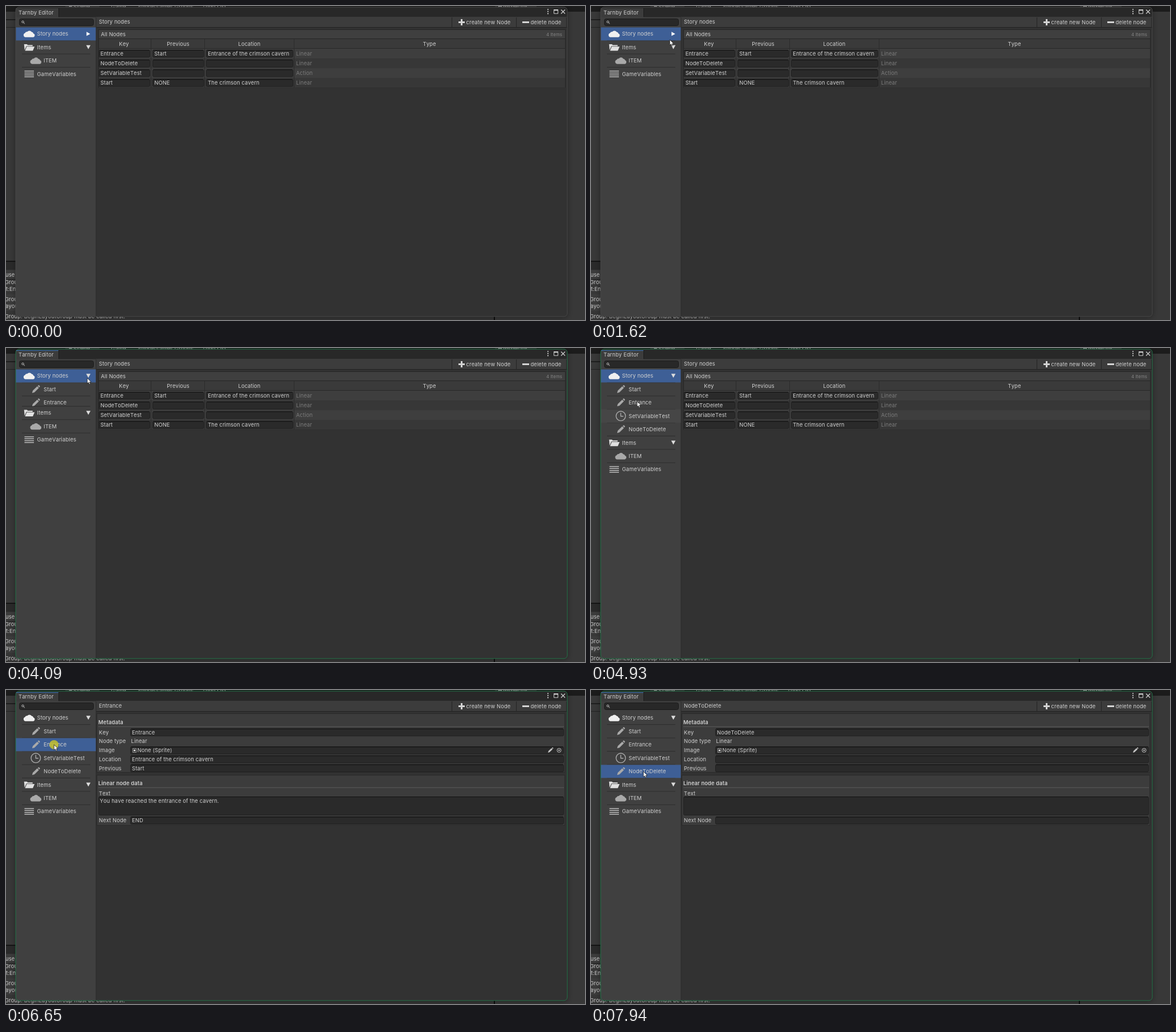
Animation, 1016 px wide and 551 px high, one loop 8 s. Source, as an HTML page:

```html
<!DOCTYPE html>
<html lang="en">
<head>
<meta charset="utf-8">
<title>Node editor</title>
<style>
  html, body { margin: 0; width: 100%; height: 100%; overflow: hidden; background: #383838; }
  svg { display: block; width: 1016px; height: 551px; }
  text {
    font: 9.4px Inter, "Liberation Sans", sans-serif;
    font-kerning: none; letter-spacing: .13px; fill: #d0d0d0; white-space: pre;
  }
  .bold { font-weight: 600; }
  .dim { fill: #7b7b7b; }
  .small { font-size: 7.8px; letter-spacing: .1px; fill: #858585; }
  .mid { text-anchor: middle; }
  .shadow { filter: drop-shadow(0 1px 5px rgba(0, 0, 0, .4)); }
</style>
</head>
<body>
<svg id="stage" viewBox="0 0 1016 551" xmlns="http://www.w3.org/2000/svg"></svg>
<script>
const LOOP = 8000, STEP = 68.3, START = 260, FOCUS = 2719;
const ROW = 23.45, TOP = 37.2, KIDS = 4;

// Markup helpers
const rect = (x, y, w, h, fill, more = '') =>
  `<rect x="${x}" y="${y}" width="${w}" height="${h}" fill="${fill}" ${more}/>`;
const path = (d, fill, more = '') => `<path d="${d}" fill="${fill}" ${more}/>`;
const line = (d, color, w = 1) => path(d, 'none', `stroke="${color}" stroke-width="${w}"`);
const text = (x, cy, s, cls = '') => `<text x="${x}" y="${cy + 3.4}" class="${cls}">${s}</text>`;
const at = (x, y, s) => `<g transform="translate(${x} ${y})">${s}</g>`;
const field = (x, y, w, h = 13) =>
  rect(x + .5, y + .5, w - 1, h - 1, '#2a2a2a', 'rx="2" stroke="#202020"') +
  rect(x + 1.5, y, w - 3, 1, '#111');

// Icons, centred on 0,0
const cloud = c => path('M-6.5 5.8A3.7 3.7 0 0 1 -7.3 -1.4A3.6 3.6 0 0 1 -3.4 -3.6A4.6 4.6 0 0 1 4.2 -3.4A3.4 3.4 0 0 1 7.4 -.8A3.4 3.4 0 0 1 7 5.8Z', c);
const folder = c => path('M-9 -5.5H-4L-2.5 -4H6V-2H-5L-8 5Z', c) + path('M-4.3 -1.2H9.5L6.3 6H-7.3Z', c);
const list = c => [-5, -1.7, 1.7, 5].map(y => rect(-8.3, y - .7, 16.6, 1.4, c)).join('');
const pencil = c => path('M-6.5 6.5L-5.3 2.3L2.5 -5.2L5.4 -2.3L-2.3 5.3ZM3.4 -6L4.6 -7.1Q5.3 -7.5 6 -6.8L7.1 -5.7Q7.6 -5 7 -4.3L6.1 -3.2Z', c);
const clock = c => `<circle r="8.3" fill="none" stroke="${c}" stroke-width="1.4"/>` + line('M0 -5.5V.5H4.5', c, 1.4);
const arrowDown = path('M-3.8 -3.4H3.8L0 3.6Z', '#dcdcdc');
const arrowRight = path('M-3 -3.6V3.6L3.4 0Z', '#fff');

const mid = i => TOP + ROW * (i + .5);
const rule = i => rect(28, TOP + ROW * i - .5, 120, 1, '#2d2d2d');
const item = (i, icon, label, depth = 0, tint = '#e0e0e0') =>
  at(depth ? 52.3 : 40.7, mid(i), icon(depth ? '#a9a9a9' : tint)) + text(depth ? 66 : 54.5, mid(i), label);

function backdrop() {
  const tabs = [[110, '# Scene'], [172, '▬ Game'], [231, 'Addressables Groups'], [344, 'Todo List'], [864, '◘ Inspector']];
  const log = [[-1, 472, 'use'], [-2, 485, 'Group'], [0, 497, 't:EndLayout'], [-2, 515, 'Group'],
    [-1, 526.5, 'ayout'], [-2, 545, 'Group: BeginLayoutGroup must be called first.']];
  return rect(0, 0, 1016, 551, '#383838') + rect(0, 0, 1016, 10, '#1c1c1c') +
    rect(104, 0, 60, 4, '#333') + rect(858, 0, 73, 9, '#333') +
    tabs.map(([x, s]) => text(x, 1.8, s)).join('') +
    rect(0, 11, 17, 12, '#383838') + rect(0, 23, 17, 2, '#1e1e1e') + rect(0, 37, 17, 1, '#222') +
    rect(0, 447, 17, 2, '#151515') + rect(0, 449, 17, 14, '#2a2a2a') +
    rect(0, 463, 17, 17, '#3c3c3c') + rect(0, 479, 17, 1, '#222') +
    rect(0, 506, 17, 29, '#3c3c3c') + rect(0, 535, 857, 16, '#363636') +
    rect(856, 535, 2, 16, '#0c0c0c') + log.map(l => text(...l)).join('');
}

function frame() {
  return rect(17, 2, 968, 543, '#323232', 'rx="6" class="shadow"') +
    path('M17 19V8Q17 2 23 2H979Q985 2 985 8V19Z', '#282828') +
    rect(17, 4, 75, 16, '#3c3c3c') + rect(92, 4, 1, 15, '#1c1c1c') +
    text(22, 12, 'Tarnby Editor') +
    [6, 9.7, 13.4].map(y => `<circle cx="951" cy="${y}" r="1.1" fill="#ccc"/>`).join('') +
    line('M961.5 6.5H968.5V13.3H961.5Z', '#ccc') + rect(961, 6, 8, 2.2, '#ccc') +
    line('M974 6.5L981 13.5M981 6.5L974 13.5', '#ccc', 1.3) +
    rect(158, 19, 827, 18.5, '#3c3c3c') + rect(158, 37, 827, 1, '#222') +
    [782, 895, 983].map(x => rect(x, 20, 1, 17, '#242424')).join('') +
    rect(794, 27, 11, 3, '#d4d4d4') + rect(798, 23, 3, 11, '#d4d4d4') + text(807.5, 28.5, 'create new Node') +
    rect(906, 27, 12, 3, '#d4d4d4') + text(920.5, 28.5, 'delete node');
}

function menu() {
  return path('M17 20H158V545H23Q17 545 17 539Z', '#404040') + rect(157.5, 20, 1, 525, '#2a2a2a') +
    rect(23.5, 22.5, 130, 12, '#282828', 'rx="3" stroke="#1a1a1a"') +
    '<circle cx="29.5" cy="27.8" r="1.7" fill="none" stroke="#c4c4c4"/>' + line('M30.7 29L33 31.3', '#c4c4c4') +
    `<clipPath id="fold"><rect id="foldBox" x="17" y="${TOP + ROW - 1}" width="141" height="0"/></clipPath>` +
    '<g clip-path="url(#fold)">' + [1, 2, 3, 4].map(rule).join('') + '</g>' +
    '<g class="low">' + [1, 2, 3].map(rule).join('') + '</g>' +
    rect(17, 0, 140.5, ROW, '#464646', 'id="hover"') + rect(17, 0, 140.5, ROW - .6, '#3e5f96', 'id="pick"') +
    item(0, cloud, 'Story nodes', 0, '#f0f0f0') +
    `<g id="shut">${at(144.3, mid(0), arrowRight)}</g><g id="open">${at(144.5, mid(0) - .3, arrowDown)}</g>` +
    '<g clip-path="url(#fold)">' + item(1, pencil, 'Start', 1) + item(2, pencil, 'Entrance', 1) +
    item(3, clock, 'SetVariableTest', 1) + item(4, pencil, 'NodeToDelete', 1) + '</g>' +
    '<g class="low">' + item(1, folder, 'Items') + at(144.5, mid(1) - .3, arrowDown) +
    item(2, cloud, 'ITEM', 1) + item(3, list, 'GameVariables', 0, '#c4c4c4') + '</g>';
}

function table() {
  const rows = [
    ['Entrance', 'Start', 'Entrance of the crimson cavern', 'Linear'],
    ['NodeToDelete', '', '', 'Linear'],
    ['SetVariableTest', '', '', 'Action'],
    ['Start', 'NONE', 'The crimson cavern', 'Linear']];
  const cols = [[162.5, 90.5], [257, 90.5], [351, 153]];
  const body = rows.map((r, i) => {
    const y = 75 + 17.1 * i;
    return rect(163, y, 818, 17.1, i % 2 ? '#373737' : '#3e3e3e') +
      cols.map(([x, w], c) => field(x, y + 2, w, 13.4) + text(x + 3.2, y + 8.7, r[c])).join('') +
      text(509, y + 8.7, r[3], 'dim');
  }).join('');
  return text(163, 27.3, 'Story nodes') +
    rect(162.5, 41.5, 819, 101.5, '#373737', 'stroke="#262626"') +
    rect(163, 42, 818, 15.5, '#3f3f3f') + rect(162, 57, 820, 1, '#262626') +
    text(166.5, 49.5, 'All Nodes') + text(948, 49.5, '4 Items', 'small') +
    rect(163, 58, 818, 16, '#3a3a3a') + rect(162, 74, 820, 1, '#292929') + body +
    [254, 348, 505].map(x => rect(x, 58, 1, 85, '#2b2b2b')).join('') +
    [[207, 'Key'], [302, 'Previous'], [427, 'Location'], [743, 'Type']]
      .map(([x, s]) => text(x, 66.2, s, 'mid')).join('');
}

function details(n) {
  const box = (y, h) => rect(159.5, y + .5, 821, h - 1, '#3c3c3c', 'stroke="#2a2a2a"');
  const head = (y, s) => text(162, y, s, 'bold') + rect(162, y + 7.3, 817, 1, '#5a5a5a');
  const row = (y, label, value = '', dx = 0) =>
    text(163, y, label) + field(218, y - 6.7, 761, 13.6) + text(221 + dx, y, value);
  const extra = n.extra || [];
  return text(163, 27.3, n.key) + box(41, 104) + head(56.5, 'Metadata') + row(74.3, 'Key', n.key) +
    text(163, 90, 'Node type') + text(219.5, 90, n.type) +
    row(106, 'Image', 'None (Sprite)', 9.5) +
    line('M222.5 102.5H228.5V109.5H222.5Z', '#b5b5b5', .8) + rect(224, 104.5, 3, 3, '#d8d8d8') +
    at(955.5, 105.5, `<g transform="scale(.68)">${pencil('#c4c4c4')}</g>`) +
    '<circle cx="970.5" cy="105.8" r="3.5" fill="none" stroke="#c4c4c4"/><circle cx="970.5" cy="105.8" r="1.3" fill="#c4c4c4"/>' +
    row(121.6, 'Location', n.place) + row(137.2, 'Previous', n.prev) +
    box(149, extra.length ? 131 : 89) + head(163.5, n.type + ' node data') +
    text(163, 181.5, 'Text') + field(162, 187, 817, 33) + text(164.5, 194.7, n.text || '') +
    row(229, 'Next Node', n.next) + extra.map((s, i) => row(246 + i * 16, s)).join('');
}

const pages = [
  table(),
  details({ key: 'Entrance', type: 'Linear', place: 'Entrance of the crimson cavern', prev: 'Start',
    text: 'You have reached the entrance of the cavern.', next: 'END' }),
  details({ key: 'SetVariableTest', type: 'Action', extra: ['Variable', 'Value'] }),
  details({ key: 'NodeToDelete', type: 'Linear' })];

const $ = s => document.querySelector(s);
$('#stage').innerHTML = backdrop() + frame() + menu() +
  pages.map(p => `<g class="page">${p}</g>`).join('') +
  rect(17, 2, 968, 543, 'none', 'id="edge" rx="6"') + rect(18, 4, 74, 1, '#3a79bb', 'id="tabLine"') +
  '<circle id="press" r="8" fill="#c4c02e" fill-opacity=".86"/>' +
  path('M0 0V9.6L2.2 7.6L3.7 11L5.4 10.2L3.9 7H6.9Z', '#fff', 'id="cursor" stroke="#111" stroke-width=".7"');

// Cursor keys: time, x, y
const route = [
  [260, 853, 508], [480, 690, 407], [750, 420, 239], [1000, 246, 131], [1300, 166, 77], [1560, 138, 59],
  [1830, 136, 60], [2100, 112, 50], [2350, 116, 38], [2650, 136, 46], [2740, 139, 47], [3150, 139, 47],
  [3450, 124, 49], [3720, 152, 50], [3800, 146, 50], [4060, 145, 50], [4400, 112, 88], [4700, 87, 122],
  [4840, 84, 114], [4900, 81, 94], [5160, 74, 72], [5420, 60, 112], [5620, 58, 131], [5760, 62, 150],
  [5930, 62, 142], [6060, 70, 118], [6250, 83, 94], [6380, 83, 94], [6750, 85, 97], [7000, 87, 108],
  [7260, 88, 118], [7460, 90, 120], [7620, 92, 143], [8000, 92, 143]];
const presses = [[2720, 3000], [3740, 4010], [6460, 6700], [7390, 7520], [7620, 7800]];
const picks = [[0, 0, 0], [6520, 2, 1], [7450, 3, 2], [7670, 4, 3]];   // time, menu row, page

function cursorAt(t) {
  const i = Math.max(1, route.findIndex(k => k[0] > t));
  const [a, b] = [route[i - 1], route[i]];
  const p = Math.max(0, (t - a[0]) / (b[0] - a[0]));
  return [a[1] + (b[1] - a[1]) * p, a[2] + (b[2] - a[2]) * p];
}

const show = (el, on) => el.style.display = on ? '' : 'none';
const rowY = i => TOP + ROW * i;
const pageEls = document.querySelectorAll('.page'), lowEls = document.querySelectorAll('.low');

function draw(now) {
  const real = now % LOOP;
  const t = real < START ? real : START + Math.floor((real - START) / STEP + .01) * STEP;
  const [x, y] = cursorAt(t);
  const place = `translate(${x} ${y})`;
  show($('#cursor'), t >= START);
  $('#cursor').setAttribute('transform', place);
  $('#press').setAttribute('transform', place);
  show($('#press'), presses.some(([a, b]) => t >= a && t < b));

  const focused = t >= FOCUS;
  $('#edge').setAttribute('stroke', focused ? '#237548' : '#484848');
  show($('#tabLine'), focused);

  const grow = Math.min(1, Math.max(0, (t - 3960) / 270));
  const fold = grow * grow * (3 - 2 * grow) * KIDS * ROW;
  $('#foldBox').setAttribute('height', fold ? fold + 1 : 0);
  lowEls.forEach(g => g.setAttribute('transform', `translate(0 ${fold})`));
  show($('#shut'), !grow);
  show($('#open'), grow);

  const [, row, page] = picks.filter(p => t >= p[0]).pop();
  $('#pick').setAttribute('y', rowY(row) + .4);
  pageEls.forEach((g, i) => show(g, i === page));

  // Only a focused window tints the hovered row, trailing the cursor slightly.
  const [, hy] = cursorAt(t - 70);
  const over = Math.floor((hy - TOP) / ROW);
  show($('#hover'), focused && over >= 0);
  $('#hover').setAttribute('y', rowY(over));
}

function tick() {
  draw(performance.now());
  requestAnimationFrame(tick);
}
tick();
</script>
</body>
</html>
```
